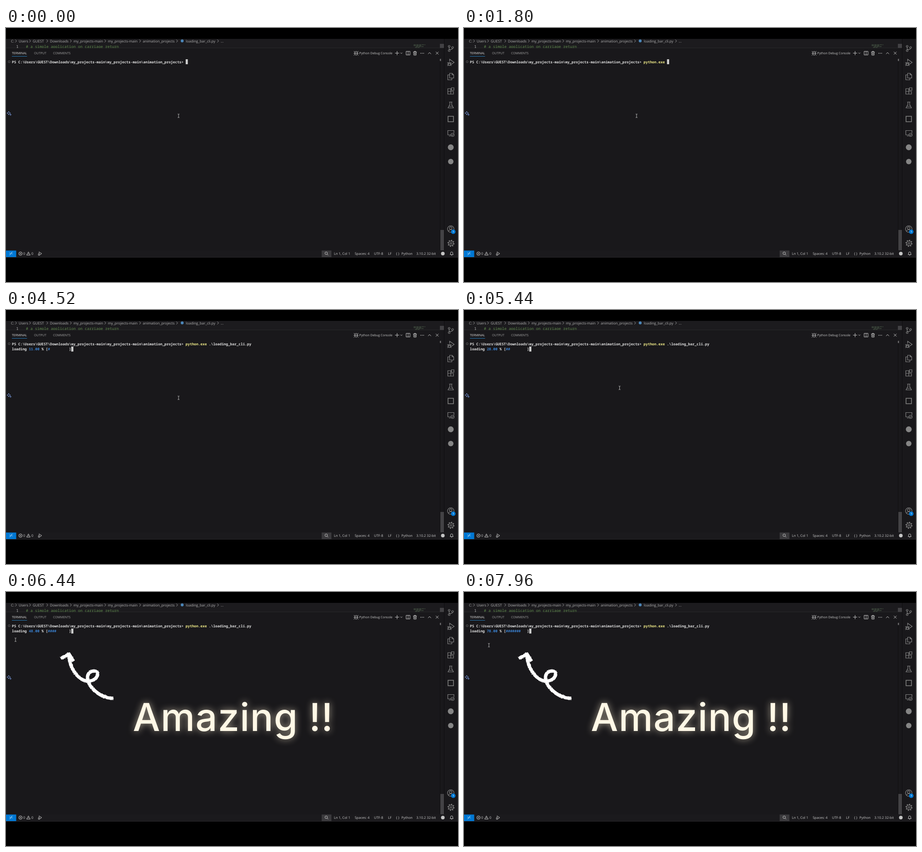
Animation of 998x561 px, one loop 8 s. Source, as an HTML page:

```html
<!DOCTYPE html>
<html lang="en">
<head>
<meta charset="utf-8">
<title>Loading bar in a terminal</title>
<style>
html, body { margin: 0; width: 100%; height: 100%; overflow: hidden; background: #000; }
svg { display: block; width: 100%; height: 100%; }
text { white-space: pre; text-rendering: geometricPrecision; font-family: "Open Sans", "Noto Sans", sans-serif; fill: #cacaca; }
.crumb text { font-size: 7.9px; fill: #b0b0b0; }
.code text { font: 8.33px "Noto Sans Mono", "DejaVu Sans Mono", monospace; fill: #bcbcbc; }
.tab text { font-size: 6.9px; fill: #a2a2a2; }
.status text { font-size: 7.5px; }
.mono text { font: 600 7.8px "Noto Sans Mono", "DejaVu Sans Mono", monospace; fill: #e2e2e2; }
.icon { fill: none; stroke: #c4c4c4; stroke-width: 1; }
.side { fill: none; stroke: #858585; stroke-width: 1.2; }
#amazing { font: 500 85px Inter, Roboto, sans-serif; letter-spacing: 1.2px; fill: #fff8e6; filter: drop-shadow(0 0 8px rgba(255, 242, 212, .6)); }
#arrow { fill: none; stroke: #fff; stroke-width: 7.5; stroke-linejoin: round; filter: url(#chalk); }
#arrow path { stroke-dasharray: 1 2; }
</style>
</head>
<body>
<svg viewBox="0 0 998 561">
  <defs>
    <filter id="chalk" color-interpolation-filters="sRGB">
      <feTurbulence type="fractalNoise" baseFrequency=".35" numOctaves="2" seed="4"/>
      <feDisplacementMap in="SourceGraphic" scale="3" xChannelSelector="R" yChannelSelector="G"/>
      <feGaussianBlur stdDeviation=".6"/>
    </filter>
    <clipPath id="editor"><path d="M0 24H967V44H0Z"/></clipPath>
  </defs>

  <!-- window surfaces -->
  <path d="M0 24H998V507H0Z" fill="#19181b"/>
  <path d="M0 24H967V44H0Z" fill="#1c1b1e"/>
  <path d="M0 44H967" stroke="#29282b"/>
  <path d="M958.5 66V491M967.5 24V491" stroke="#0f0e10"/>
  <path d="M0 491H998V507H0Z" fill="#1b1a1d"/>
  <path d="M0 506.5H998" stroke="#29282b"/>
  <path d="M959 446H967V491H959Z" fill="#434245"/>
  <path d="M958 35H967V44H958Z" fill="#424144"/>
  <path d="M958 68H960.5V73H958Z" fill="#69686a"/>

  <g class="crumb" id="crumbs"></g>
  <circle cx="389" cy="28.5" r="3.2" fill="#4b86b8"/>
  <g class="code" clip-path="url(#editor)">
    <text x="22.5" y="43.8">1</text>
    <text x="44" y="43.8" style="fill:#618c4e">#&#160;a simple application on carriage return</text>
    <path d="M900 37H926M900 39H917M905 41H922M903 43H913" stroke="#4b5d48" stroke-dasharray="5 1"/>
  </g>

  <g class="tab">
    <text x="13" y="58.1" style="fill:#e2e2e2">TERMINAL</text>
    <text x="62" y="58.1">OUTPUT</text>
    <text x="104" y="58.1">COMMENTS</text>
    <text x="780" y="58.4" style="fill:#cacaca">Python Debug Console</text>
  </g>
  <path d="M13 62.5H46.5" stroke="#287bb5"/>
  <g class="icon">
    <path d="M770.5 53.5Q773 49.5 775.5 53.5V58Q773 62 770.5 58ZM770 55.8H776M768 51L770.5 53.5M778 51L775.5 53.5M768 60.5L770.5 58M778 60.5L775.5 58M767.5 55.8H770M776 55.8H778.5"/>
    <path d="M859 55.5H868M863.5 51V60M871 54.5L873 56.5L875 54.5"/>
    <path d="M883.5 51.5H892V59.5H883.5ZM887.8 51.5V59.5"/>
    <path d="M899 53H907M901.5 53V51.5H904.5V53M900 53L900.5 60H905.5L906 53M902 54.5V58.5M904 54.5V58.5"/>
    <path d="M915 55.8H923" stroke-width="1.5" stroke-dasharray="1.5 1.7"/>
    <path d="M932 57.5L935.2 54L938.5 57.5M949 52.5L955 58.5M955 52.5L949 58.5"/>
  </g>

  <!-- terminal -->
  <circle cx="7" cy="74.5" r="2.2" fill="none" stroke="#666" stroke-width=".9"/>
  <g class="mono">
    <text x="13" y="77.8"><tspan id="prompt"></tspan><tspan id="command" fill="#f3ee8a"></tspan><tspan id="script"></tspan></text>
    <text x="13" y="89.3" id="progress">loading <tspan id="percent" fill="#3b82d2"></tspan> % [<tspan id="hashes" fill="#3b82d2"></tspan><tspan id="rest"></tspan></text>
  </g>
  <rect id="caret" width="4.7" height="11" fill="#cfcfcf"/>
  <path d="M6 184Q6.5 187.5 10 188Q6.5 188.5 6 192Q5.5 188.5 2 188Q5.5 187.5 6 184ZM10 189.5V193.5M8 191.5H12" fill="none" stroke="#7e9fe6" stroke-width=".9"/>
  <path id="mouse" d="M-2 -4Q0 -4 0 -3Q0 -4 2 -4M0 -3V3M-2 4Q0 4 0 3Q0 4 2 4" fill="none" stroke="#c8c8c8" stroke-width=".9"/>

  <!-- activity bar -->
  <g class="side">
    <g transform="translate(982 45)"><circle cx="-3.5" cy="-4.5" r="2"/><circle cx="-3.5" cy="5" r="2"/><circle cx="4" cy="-2" r="2"/><path d="M-3.5 -2.5V3M4 0Q4 2.5 -3 2.5"/></g>
    <g transform="translate(982 76)"><path d="M-2.5 -2V-7L7.5 0L0 5"/><ellipse cx="-3" cy="3.5" rx="2.4" ry="3.3"/><path d="M-5.5 2.5H-.5M-7.5 0L-5 2M-8 4H-5.4M-7.5 7.5L-5 5.5M1.5 0L-1 2M2 4H-.6M1.5 7.5L-1 5.5"/></g>
    <path transform="translate(982 107)" d="M-2.5 -7H3L6.5 -3.5V3.5H-2.5ZM3 -7V-3.5H6.5M-2.5 -3.5H-6.5V7.5H2.5V3.5"/>
    <path transform="translate(982 139)" d="M-6.5 -5H0V7H-6.5ZM-6.5 1H6V7H0M6 1V7M1.5 -7H7V-1.5H1.5Z"/>
    <path transform="translate(982 170)" d="M-3.5 -6.5H3.5M-2 -6.5V-1L-6 6.5H6L2 -1V-6.5M-4 3H4"/>
    <path d="M976 195H988V207H976Z" stroke-width="1.5"/>
    <g transform="translate(982 232)"><path d="M0 4H-6.5V-5.5H7V0M-4 6.5H0"/><circle cx="4" cy="4" r="3.5"/><path d="M2.3 4L3.5 5.2L5.7 2.8"/></g>
    <circle cx="982" cy="263.5" r="6.5" fill="#858585" stroke="none"/>
    <circle cx="982" cy="295" r="6" fill="#858585" stroke="none"/>
    <g transform="translate(982 444)"><circle r="7.2"/><circle cy="-2" r="2.8"/><path d="M-5 5Q-4 1.5 0 1.5Q4 1.5 5 5"/></g>
    <g transform="translate(982.5 475.5)"><circle r="2"/><circle r="5.2"/><circle r="6.7" stroke-width="2" stroke-dasharray="2.4 2.86"/></g>
  </g>
  <circle cx="987.5" cy="450" r="5" fill="#0078d4"/>
  <text x="985.9" y="452.2" style="font-size:6px;font-weight:600;fill:#fff">1</text>

  <!-- status bar -->
  <path d="M0 491.5H22.5V506H0Z" fill="#0078d4"/>
  <path d="M697 491.5H718.5V506H697Z" fill="#3a393c"/>
  <g class="icon">
    <path d="M8 496.5L10.5 499L8 501.5M14 494.5L11.5 497L14 499.5" stroke="#fff"/>
    <circle cx="32" cy="498.3" r="3.8"/><path d="M30.3 496.6L33.7 500M33.7 496.6L30.3 500"/>
    <path d="M49.5 494.5L53.5 501.5H45.5ZM49.5 497V499.5"/>
    <path d="M73 497V494.5L79 498.3L75.5 500.5M71.5 498.5H74.5V502H71.5Z"/>
    <circle cx="707" cy="497.5" r="2.8"/><path d="M709 499.5L711.5 502"/>
    <path d="M980.5 500.5H987.5L986.5 499V497Q986.5 494.5 984 494.5Q981.5 494.5 981.5 497V499ZM983 502H985"/>
  </g>
  <circle cx="964.5" cy="498.3" r="4" fill="#c4c4c4"/>
  <g class="status">
    <text x="38" y="501">0</text><text x="56" y="501">0</text>
    <text x="724" y="501">Ln 1, Col 1</text>
    <text x="770" y="501">Spaces: 4</text>
    <text x="812.5" y="501">UTF-8</text>
    <text x="843.5" y="501">LF</text>
    <text x="861" y="501">{ }</text>
    <text x="873" y="501">Python</text>
    <text x="906" y="501">3.10.2 32-bit</text>
  </g>

  <!-- overlay -->
  <text id="amazing" y="307"><tspan x="280">Amazing</tspan><tspan x="669">!!</tspan></text>
  <g id="arrow">
    <path id="tail" pathLength="1" d="M237 235C208 234 183 212 180 191C179 179 188 173 198 175C206 178 202 190 193 194C184 199 174 197 166 192C150 181 139 160 139 138"/>
    <path id="head" pathLength="1" d="M121 147L139 137L149 153"/>
  </g>
</svg>
<script>
const LOOP = 8000, STEP = 40, CHAR = 4.68, LEFT = 13;
const PROMPT = 'PS C:\\Users\\GUEST\\Downloads\\my_projects-main\\my_projects-main\\animation_projects> ';
const COMMAND = 'python.exe ', SCRIPT = '.\\loading_bar_cli.py';
const RUN = 3960;
const el = Object.fromEntries([...document.querySelectorAll('[id]')].map(e => [e.id, e]));

const crumbs = [[11, 'C:'], [28, 'Users'], [59, 'GUEST'], [97, 'Downloads'], [149, 'my_projects-main'],
  [225, 'my_projects-main'], [302, 'animation_projects'], [397, 'loading_bar_cli.py'], [474, '...']];
el.crumbs.innerHTML = crumbs.map(([x, name], i) => `<text x="${x}" y="31.7">${name}</text>` +
  (i ? `<path d="M${x - (i === 7 ? 21 : 7.5)} 25.7l3 3l-3 3" fill="none" stroke="#a0a0a0"/>` : '')).join('');
el.prompt.textContent = PROMPT;

// Times at which each further character of the command appears.
const keyTimes = [600, 800, 880, 960, 1040, 1120, 1160, 1240, 1320, 1320, 1720];
const pointerPath = [[0, 381, 194], [5160, 381, 194], [5440, 343.5, 172], [5800, 184, 188],
  [6320, 21, 105.5], [6520, 21, 105.5], [7320, 39, 105.5], [7840, 55, 117.5], [LOOP, 55, 117.5]];

const ramp = (t, from, to) => Math.min(1, Math.max(0, (t - from) / (to - from)));

function pointerAt(t) {
  const i = pointerPath.findIndex(p => p[0] > t);
  const [t0, x0, y0] = pointerPath[i - 1], [t1, x1, y1] = pointerPath[i];
  const k = ramp(t, t0, t1);
  return [x0 + (x1 - x0) * k, y0 + (y1 - y0) * k];
}

function scriptAt(t) {
  if (t >= 2880) return SCRIPT;
  return 'loa'.slice(0, t < 2640 ? 0 : t < 2720 ? 1 : t < 2800 ? 2 : 3);
}

function drawStroke(path, amount) {
  path.style.visibility = amount > 0 ? 'visible' : 'hidden';
  path.style.strokeDashoffset = 1 - amount;
}

function render(t) {
  const command = COMMAND.slice(0, keyTimes.filter(k => k <= t).length);
  const script = scriptAt(t);
  el.command.textContent = command;
  el.script.textContent = script;

  const running = t >= RUN;
  let column = PROMPT.length + command.length + script.length;
  el.progress.style.visibility = running ? 'visible' : 'hidden';
  if (running) {
    const percent = Math.floor(11.06 + (t - 4520) / 51.3);
    const done = Math.floor(percent / 10);
    el.percent.textContent = percent.toFixed(2);
    el.hashes.textContent = '#'.repeat(done);
    el.rest.textContent = ' '.repeat(10 - done) + ']';
    column = el.progress.textContent.length;
  }
  el.caret.setAttribute('x', LEFT + column * CHAR);
  el.caret.setAttribute('y', running ? 80.7 : 69);
  el.mouse.setAttribute('transform', `translate(${pointerAt(t)})`);

  el.amazing.style.opacity = ramp(t, 5440, 5600);
  drawStroke(el.tail, ramp(t, 5600, 6000));
  drawStroke(el.head, ramp(t, 6000, 6160));
}

function tick() {
  render(Math.floor(performance.now() % LOOP / STEP) * STEP);
  requestAnimationFrame(tick);
}
tick();
</script>
</body>
</html>
```
